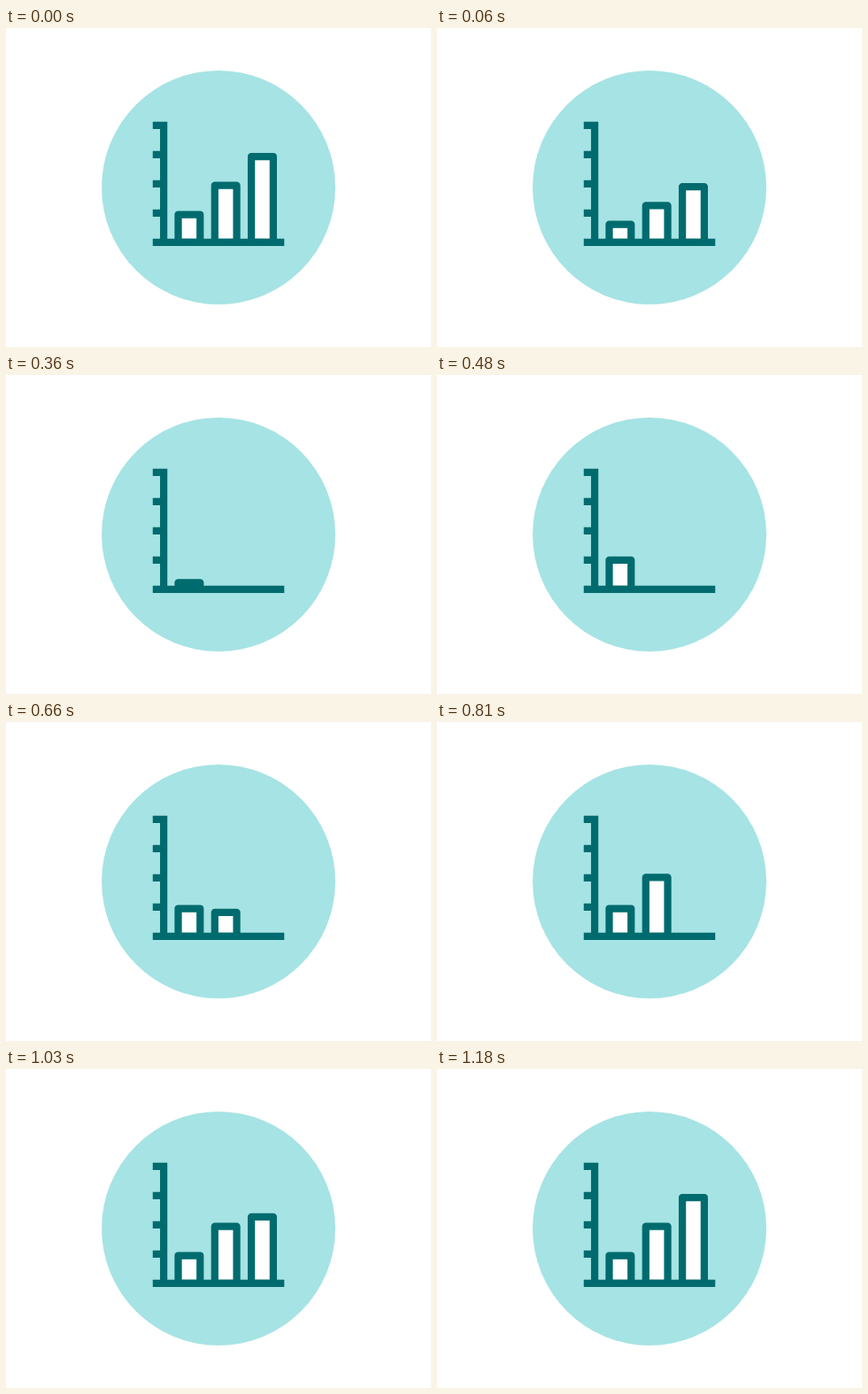
Recreate the animation shown at these times as an HTML page. Size 480x360 px, loop 1.88 s.

```html
<!DOCTYPE html>
<html lang="en">
<head>
<meta charset="utf-8">
<title>Growing bar chart</title>
<style>
  html, body { margin: 0; height: 100%; overflow: hidden; background: #fff; }
  svg { display: block; width: 100%; height: 100%; }
  path { stroke: #006b6e; stroke-width: 8.25; fill: none; }
  .bar { fill: #fff; stroke-linejoin: round; }
</style>
</head>
<body>
<svg viewBox="0 0 480 360">
  <circle cx="240" cy="180" r="132" fill="#a6e3e4"/>
  <path class="bar"/>
  <path class="bar"/>
  <path class="bar"/>
  <path d="M165.75 109.9H178.1V241.9M165.75 142.9h12.4M165.75 175.9h12.4M165.75 208.9h12.4M165.75 241.9h148.5"/>
</svg>
<script>
const LOOP = 1880, STEP = 30, BASE = 241.9, OVERSHOOT = 1.07;
const shrink = { start: 0, end: 150 };
const bars = [
  { x: 194.5, height: 31.4, start: 300, peak: 495, end: 555 },
  { x: 235.8, height: 64.2, start: 570, peak: 780, end: 840 },
  { x: 277.1, height: 96.9, start: 870, peak: 1115, end: 1180 }
];
const paths = document.querySelectorAll('.bar');

// Smooth progress from 0 to 1 between two times
function ease(t, from, to) {
  const p = Math.min(1, Math.max(0, (t - from) / (to - from)));
  return p * p * (3 - 2 * p);
}

function scaleAt(t, bar) {
  if (t < shrink.end) return 1 - ease(t, shrink.start, shrink.end);
  const rise = OVERSHOOT * ease(t, bar.start, bar.peak);
  return rise - (OVERSHOOT - 1) * ease(t, bar.peak, bar.end);
}

function draw(now) {
  const time = now % LOOP;
  // The last bar's steps run 10 ms behind the regular grid
  const lag = time >= 940 ? 10 : 0;
  const t = Math.floor((time - lag) / STEP) * STEP + lag;
  bars.forEach((bar, i) => {
    const h = bar.height * scaleAt(t, bar);
    paths[i].setAttribute('d', `M${bar.x} ${BASE}v${-h}h24.75v${h}z`);
    paths[i].style.display = h > 0.01 ? '' : 'none';
  });
}

const origin = performance.now();
function loop() {
  draw(performance.now() - origin);
  requestAnimationFrame(loop);
}
loop();
</script>
</body>
</html>
```
